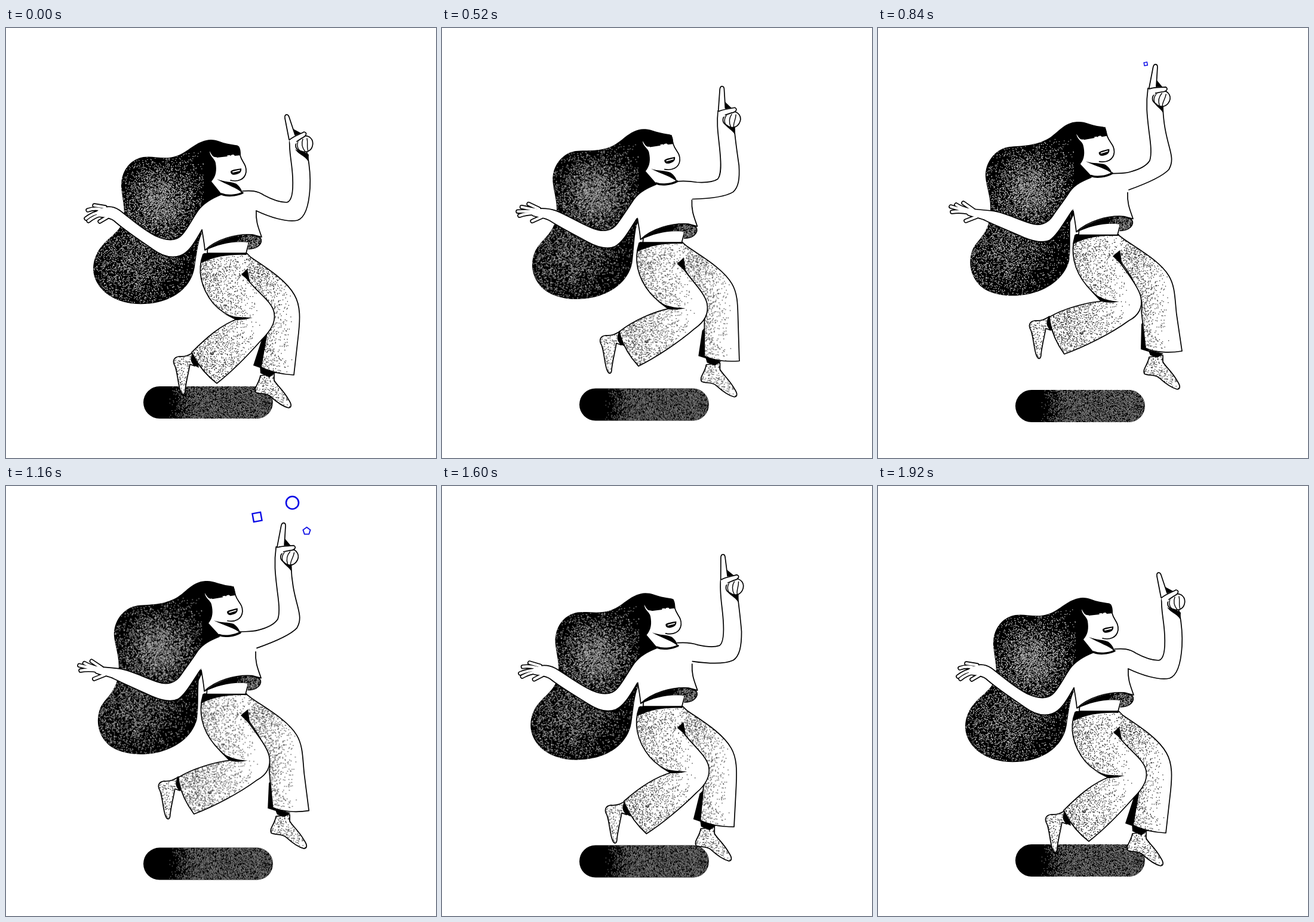
An HTML page with a canvas for the animation above (2400 ms loop, 720 by 720 pixels).

```html
<!DOCTYPE html>
<html lang="en">
<head>
<meta charset="utf-8">
<title>Dancer</title>
<style>
html, body { margin: 0; height: 100%; overflow: hidden; background: #fff; }
canvas { display: block; }
</style>
</head>
<body>
<canvas id="stage" width="720" height="720"></canvas>
<script>
const ctx = document.getElementById('stage').getContext('2d');
const clamp = v => Math.max(0, Math.min(1, v));
const smooth = v => (v = clamp(v), v * v * (3 - 2 * v));
const bell = (x, c, w) => Math.exp(-(((x - c) / w) ** 2));

let seed = 7;
const rnd = () => (seed = (seed * 16807) % 2147483647) / 2147483647;

// Speckle layer: dots scattered with a density that depends on place.
function grain(color, x0, y0, x1, y1, density) {
  const layer = document.createElement('canvas');
  layer.width = layer.height = 720;
  const g = layer.getContext('2d');
  g.fillStyle = color;
  for (let y = y0; y < y1; y += 1.25)
    for (let x = x0; x < x1; x += 1.25)
      if (rnd() < density(x, y)) g.fillRect(x + rnd(), y + rnd(), 1.25, 1.25);
  return layer;
}

const grains = {
  hair: grain('#d8d8d8', 140, 205, 330, 470, (x, y) =>
    0.55 * bell(x, 260, 54) * bell(y, 285, 54) + 0.32 * bell(x, 212, 76) * bell(y, 392, 68)),
  ground: grain('#8c8c8c', 230, 598, 450, 658, x => 0.6 * clamp((x - 272) / 45)),
  front: grain('#111', 275, 380, 440, 600, x => 0.25 * clamp((425 - x) / 90)),
  back: grain('#111', 395, 378, 500, 590, x => 0.24 * clamp((478 - x) / 55)),
  feet: grain('#111', 270, 535, 485, 640, () => 0.16),
  hem: grain('#bbb', 385, 340, 435, 375, x => 0.5 * clamp((x - 385) / 22))
};

// Each pair holds the crouched and the leaping outline of one part.
const parts = {
  hair: [
    'M343 187C322 188 310 202 295 210C270 224 250 213 230 216C206 220 192 242 193 266C194 285 201 305 196 322C190 345 168 350 153 376C138 405 149 430 170 446C195 464 228 465 255 459C285 452 311 432 316 400C320 375 322 350 332 338L362 280L393 212C393 200 390 196 384 196C374 194 365 193 358 190C353 188 348 187 343 187Z',
    'M333 157C312 158 300 176 287 184C264 198 240 197 219 199C195 203 179 226 180 249C181 265 190 285 188 310C186 345 165 355 158 372C148 400 160 425 178 437C200 450 228 450 250 446C282 440 312 420 320 390C323 370 321 350 322 325L356 250L383 180C383 168 380 165 374 165C364 164 356 161 349 159C343 157 338 157 333 157Z'],
  frontLeg: [
    'M404 378L330 379C320 405 326 435 347 461C360 476 375 483 388 487C360 497 335 519 311 543L314 549C325 570 340 585 353 595C375 578 405 548 428 522C442 508 452 494 449 477C445 455 415 440 397 411',
    'M403 347L330 347C322 375 327 405 350 432C362 446 370 452 378 457C350 459 310 470 287 484L288 492C292 515 302 532 312 546C345 534 390 512 420 490C436 482 444 468 440 450C435 430 412 405 398 381'],
  backLeg: [
    'M403 377L410 384C430 398 468 420 483 447C494 466 492 490 490 510L482 581C465 580 445 577 427 568L437 510C445 500 420 440 397 411',
    'M403 347L411 353C435 370 472 390 487 415C498 433 497 455 500 480L509 541C490 544 465 544 448 536L441 474C448 455 420 405 398 381'],
  kneeFold: [
    'M358 475C375 485 395 484 413 485C400 488 394 489 385 489Z',
    'M356 440C372 454 388 457 404 458C390 461 380 460 372 457Z'],
  cuffInside: ['M437 514L428 522L414 565L428 570Z', 'M448 486L441 496L440 538L453 542Z'],
  ankle: ['M425 566L452 577L441 585L426 578Z', 'M452 539L478 545L468 552L456 548Z'],
  crotch: ['M404 403L394 413L408 424Z', 'M405 372L393 382L409 398Z'],
  leftArm: [
    'M360 279C345 285 332 292 322 305C312 319 305 335 295 346C285 358 268 356 250 348C228 337 210 320 190 305C180 298 168 298 158 302C148 307 150 313 154 316C162 318 172 316 181 323C200 340 225 356 245 370C260 381 276 387 292 381C308 375 318 355 328 338',
    'M357 250C345 255 330 261 321 274C308 294 298 306 293 314C284 328 270 332 255 327C230 319 210 308 190 306C180 305 168 304 158 303C148 303 146 309 150 313C160 318 170 317 181 323C200 332 225 342 245 351C260 357 276 361 288 355C300 347 312 325 325 306'],
  fingers: [
    'M166 300L148 297M160 304Q148 301 137 305M158 308Q146 310 134 319M160 312Q148 315 138 323M169 317L157 324',
    'M160 305L143 293M154 305Q140 302 131 296M152 307Q138 304 122 299M152 309Q138 306 124 308M165 316L147 323'],
  rightArm: [
    'M396 273C410 272 420 272 432 280C445 287 458 292 470 292C480 290 481 270 480 250C479 225 473 205 475 186L500 195L505 213C509 235 510 250 509 268C507 300 500 318 488 322C470 326 440 316 419 306',
    'M390 244C402 243 412 244 422 241C437 237 449 232 455 222C459 210 456 190 454 175C451 150 448 130 452 101L476 110L477 132C478 160 482 178 488 200C492 215 494 225 487 237C475 250 445 262 420 271'],
  wristShade: [
    'M484 203C492 208 503 207 507 212L506 223C500 214 490 212 484 203Z',
    'M460 121C466 126 474 126 478 128L478 143C473 134 465 132 460 121Z']
};

function morph(name, k) {
  const [from, to] = parts[name], ends = to.match(/[\d.]+/g);
  let i = 0;
  return new Path2D(from.replace(/[\d.]+/g, v => (+v + (ends[i++] - v) * k).toFixed(2) + ' '));
}

const path = d => typeof d === 'string' ? new Path2D(d) : d;
function fill(d, color = '#000') {
  ctx.fillStyle = color;
  ctx.fill(path(d));
}
function line(d, width = 1.7, color = '#000') {
  ctx.lineWidth = width;
  ctx.strokeStyle = color;
  ctx.stroke(path(d));
}
function shape(d, base = '#fff') {
  d = path(d);
  fill(d, base);
  line(d);
}
function speckle(d, layer, dx = 0, dy = 0) {
  ctx.save();
  ctx.clip(path(d));
  ctx.drawImage(layer, dx, dy);
  ctx.restore();
}
function group(dx, dy, draw, angle = 0, px = 0, py = 0) {
  ctx.save();
  ctx.translate(dx + px, dy + py);
  ctx.rotate(angle * Math.PI / 180);
  ctx.translate(-px, -py);
  draw();
  ctx.restore();
}

function foot(d) {
  shape(d);
  speckle(d, grains.feet);
}

function ground(k) {
  const bar = new Path2D();
  bar.roundRect(230, 600, 217, 54, 27);
  group(0, 6 * k, () => {
    fill(bar);
    speckle(bar, grains.ground);
  });
}

function legs(k) {
  group(28 * k, -31 * k, () =>
    foot('M426 582C424 595 414 603 418 610C425 614 435 610 443 617C455 628 465 634 473 636C480 635 477 628 473 622C464 606 455 600 449 590L449 579Z'));
  group(-27 * k, -60 * k, () => {
    foot('M314 543C306 548 300 551 290 550C281 551 278 558 283 566C288 580 288 600 293 610C296 616 300 614 300 606C302 590 306 575 308 563L316 566Z');
    fill('M313 542C308 552 308 559 315 565L323 569L320 552Z');
  });
  fill(morph('ankle', k));
  fill(morph('cuffInside', k));
  const back = morph('backLeg', k), front = morph('frontLeg', k);
  shape(back);
  speckle(back, grains.back, 8 * k, -32 * k);
  shape(front);
  speckle(front, grains.front, -4 * k, -34 * k);
  fill(morph('kneeFold', k));
  fill(morph('crotch', k));
  group(0, -32 * k, () => fill('M331 377L404 377L402 380C375 379 350 382 326 394Z'));
}

function torso(k) {
  group(-k, -30.5 * k, () => {
    fill('M338 362L337 377L402 377L407 352Z', '#fff');
    line('M338 364L337 377L402 377L406 362');
    const inside = 'M333 373C352 355 385 345 413 346C430 348 430 358 424 364C418 369 412 370 406 370L405 359C382 356 355 362 333 373Z';
    fill(inside);
    speckle(inside, grains.hem);
    line('M410 347C432 346 431 361 420 367C415 370 410 370 406 370', 1.4);
    fill('M328 337C330 350 332 360 333 372C352 354 385 344 413 346L428 350C423 335 418 325 419 306L420 273L396 273C385 282 370 282 360 279L325 300Z', '#fff');
    line('M328 337C330 350 332 360 333 372C352 354 385 344 413 346L428 350C423 335 418 325 419 306');
  });
}

function head(k) {
  group(-4 * k, -31 * k, () => {
    fill('M341 206C345 214 347 217 353 216L380 212L392 213C395 225 403 228 402 241C400 254 388 258 376 255L392 264L396 277C385 282 370 281 361 278L344 257C352 248 353 238 351 226C350 219 341 215 341 206Z', '#fff');
    fill('M343 198L353 217L371 215L366 207L376 214L380 210L383 214L393 213L390 198Z');
    line('M392 213C395 225 403 228 402 241C400 254 388 258 376 255');
    fill('M353 253C366 258 378 257 386 261C392 266 395 271 396 277C388 268 370 263 353 253Z');
    fill('M376 240C378 237 390 236 394 235C395 241 391 244 386 245C380 247 376 245 376 240Z');
    line('M380 241L391 238.5', 1.8, '#fff');
    line('M361 278C370 282 385 281 396 276', 3.5);
  }, -4 * k, 370, 275);
}

function leftArm(k) {
  const fingers = morph('fingers', k);
  line(fingers, 7.4);
  shape(morph('leftArm', k));
  line(fingers, 4.2, '#fff');
}

function rightArm(q) {
  shape(morph('rightArm', q));
  fill(morph('wristShade', q));
  group(-20 * q, -85 * q, () => {
    fill('M481 169L496 177L484 186Z');
    shape('M494 182C508 177 516 187 513 198C510 208 500 209 494 206C487 205 483 200 486 191Z');
    line('M497 186C494 194 497 202 501 207M504 185C506 193 503 200 506 206M490 188C486 195 488 203 493 206', 1.4);
    fill('M474 187L467 151C466 144 472 143 474 149L484 180L499 174C505 175 503 181 496 184L487 192L478 200Z', '#fff');
    line('M474 187L467 151C466 144 472 143 474 149L484 179M475 187C482 181 492 178 499 174C505 175 503 181 496 184L487 190');
  }, 22 * q ** 0.65, 475, 186);
}

function polygon(sides, radius, turn) {
  ctx.beginPath();
  for (let i = 0; i < sides; i++) {
    const a = turn + i * 2 * Math.PI / sides;
    ctx.lineTo(radius * Math.cos(a), radius * Math.sin(a));
  }
  ctx.closePath();
}

function spark(t, start, x, y, trace, width) {
  const out = smooth((t - start) / 240);
  const size = out * (1 - smooth((t - 1240) / 200));
  if (size < 0.03) return;
  ctx.save();
  ctx.translate(465 + (x - 465) * out, 65 + (y - 65) * out);
  ctx.scale(size, size);
  trace();
  ctx.lineWidth = width / Math.sqrt(size);
  ctx.strokeStyle = '#0a0ae6';
  ctx.stroke();
  ctx.restore();
}

function draw(t) {
  ctx.fillStyle = '#fff';
  ctx.fillRect(0, 0, 720, 720);
  ctx.lineJoin = ctx.lineCap = 'round';
  const u = Math.min(t / 960, 2);
  const k = 0.52 * (1 - Math.cos(Math.PI * u));
  // The raised arm trails behind the body.
  const q = u < 1 ? k ** 1.1 : 0.52 * (1 + Math.cos(Math.PI * (u - 1) ** 1.25));

  ground(k);
  const hair = morph('hair', k);
  fill(hair);
  speckle(hair, grains.hair, -3 * k, -20 * k);
  legs(k);
  torso(k);
  rightArm(q);
  leftArm(k);
  head(k);

  ctx.lineJoin = 'miter';
  spark(t, 740, 420.5, 52, () => polygon(4, 9.8, Math.PI / 4 - 0.18), 2.4);
  spark(t, 840, 479.5, 28, () => {
    ctx.beginPath();
    ctx.arc(0, 0, 10.5, 0, 7);
  }, 2.6);
  spark(t, 860, 503.5, 75.5, () => polygon(5, 6.4, -Math.PI / 2), 1.8);
}

function tick(now) {
  draw(Math.floor(now % 2400 / 40) * 40);
  requestAnimationFrame(tick);
}
requestAnimationFrame(tick);
</script>
</body>
</html>
```
